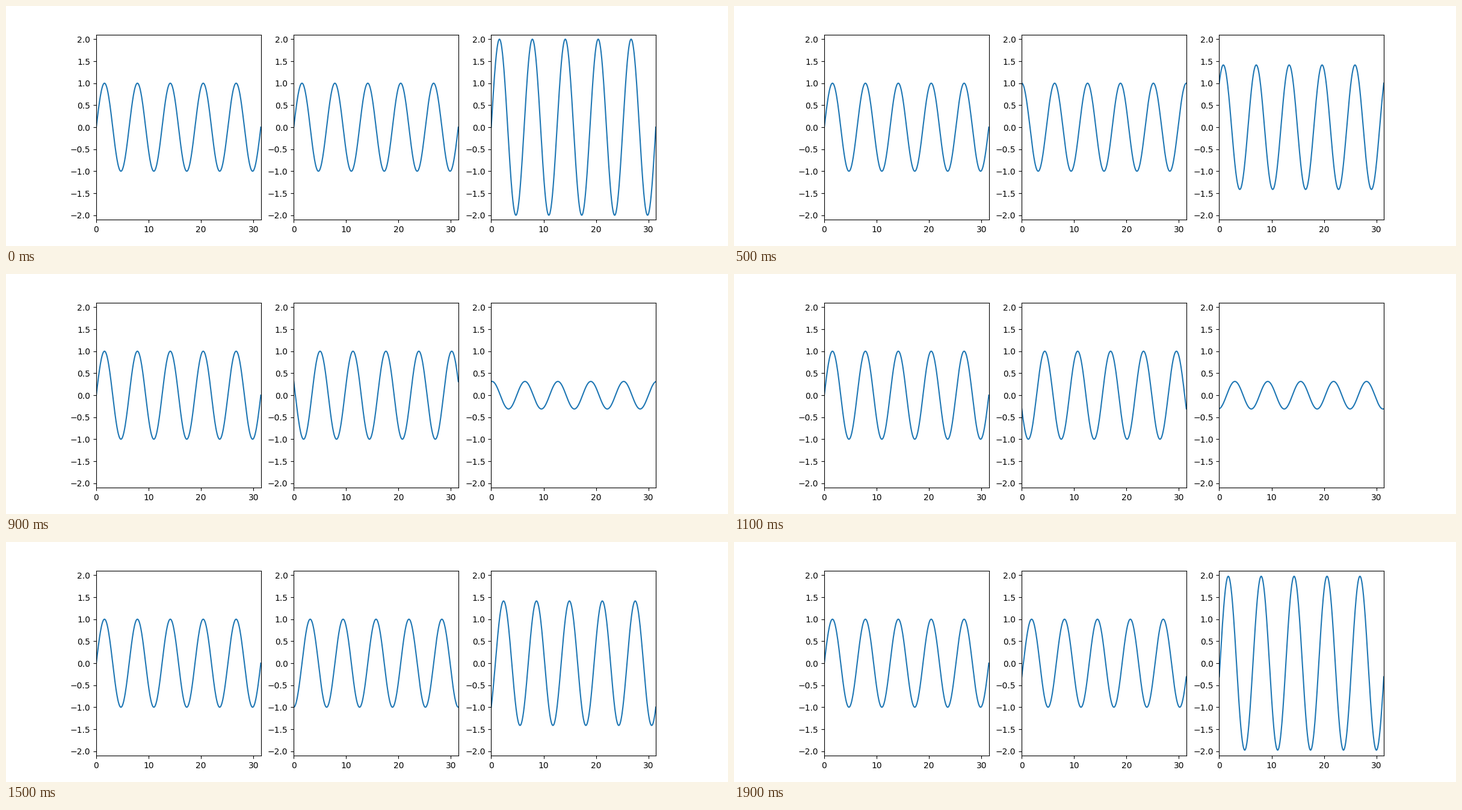
These frames come from a looping animation (1200x400 px, 2 s). A matplotlib script:

```python
import numpy as np
import matplotlib.pyplot as plt
from matplotlib.animation import FuncAnimation

FRAMES = 20
INTERVAL = 100
X_MAX = 10 * np.pi

x = np.linspace(0, X_MAX, 1000)
fixed = np.sin(x)

fig, axes = plt.subplots(1, 3, figsize=(12, 4), dpi=100)
for ax in axes:
    ax.set_xlim(0, X_MAX)
    ax.set_ylim(-2.1, 2.1)

axes[0].plot(x, fixed)
shifted_line, = axes[1].plot(x, fixed)
sum_line, = axes[2].plot(x, 2 * fixed)


def update(i):
    """Shift the middle wave and show its sum with the fixed one."""
    shifted = np.sin(x + 2 * np.pi * i / FRAMES)
    shifted_line.set_ydata(shifted)
    sum_line.set_ydata(fixed + shifted)
    return shifted_line, sum_line


anim = FuncAnimation(fig, update, frames=FRAMES, interval=INTERVAL, repeat=True)
plt.show()
```
